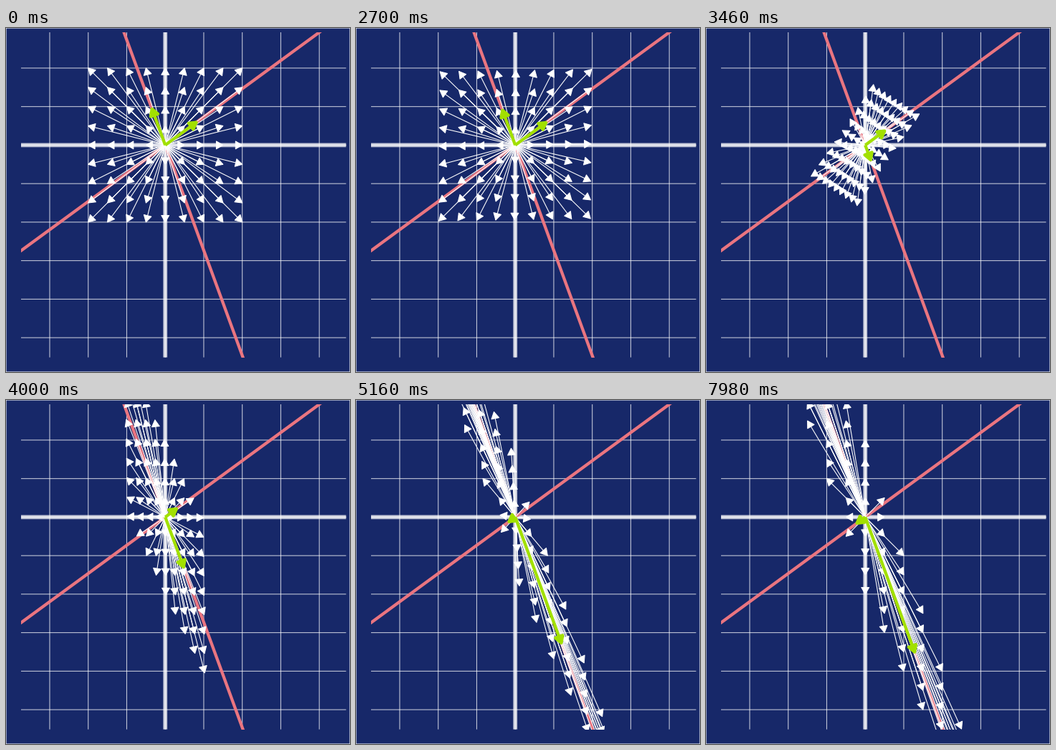
These frames come from a looping animation (480 px wide and 480 px high, 8 s). A matplotlib script:

```python
import numpy as np
import matplotlib.pyplot as plt
from matplotlib.animation import FuncAnimation
from matplotlib.collections import LineCollection, PolyCollection
from matplotlib.patches import Rectangle

SIZE, DPI = 480, 96
PX = 72 / DPI  # one pixel in points
NAVY, PINK, LIME = "#172869", "#EA7580", "#A2E000"

ORIGIN = np.array([222.2, 163.4])
UNIT = 53.74
LEFT, RIGHT, TOP, BOTTOM = 20.8, 474.5, 5.5, 459.6
HEAD = 10.8  # edge length of an arrowhead
LINE, AXIS, BOLD = 1.07, 5.7, 4.27

HOLD, MOVE = 134, 132
progress = np.concatenate([np.zeros(HOLD), np.linspace(0, 1, MOVE), np.ones(HOLD)])

A = np.array([[-1, 1], [2, -3]])
slopes = np.array([-1 + np.sqrt(3), -1 - np.sqrt(3)])

steps = np.arange(-4, 5) / 2
lattice = np.array([(x, y) for x in steps for y in steps if x or y])
eigen = np.array([(1, m) for m in slopes]) / np.sqrt(1 + slopes**2)[:, None]
eigen[1] *= -1

fig = plt.figure(figsize=(SIZE / DPI, SIZE / DPI), dpi=DPI, facecolor=NAVY)
ax = fig.add_axes([0, 0, 1, 1])
ax.set_xlim(0, SIZE)
ax.set_ylim(SIZE, 0)
ax.axis("off")

panel = Rectangle((LEFT, TOP), RIGHT - LEFT, BOTTOM - TOP,
                  transform=ax.transData)


def to_px(v):
    return ORIGIN + UNIT * v * [1, -1]


def rule(xs, ys, color, width, alpha=1.0, z=1):
    line, = ax.plot(xs, ys, color=color, lw=width * PX, alpha=alpha, zorder=z,
                    solid_capstyle="butt", snap=False)
    line.set_clip_path(panel)


class Arrows:
    """Vectors from the origin with closed triangular heads."""

    def __init__(self, vectors, color, width, z):
        self.vectors = vectors
        self.shafts = LineCollection([], colors=color, linewidths=width * PX,
                                     capstyle="butt", zorder=z)
        self.heads = PolyCollection([], facecolors=color, edgecolors=color,
                                    linewidths=width * PX, joinstyle="round",
                                    zorder=z + 0.1)
        for part in (self.shafts, self.heads):
            ax.add_collection(part, autolim=False)
            part.set_clip_path(panel)

    def update(self, matrix):
        tips = to_px(self.vectors @ matrix.T)
        d = tips - ORIGIN
        length = np.maximum(np.hypot(d[:, 0], d[:, 1]), 1e-9)
        d = d / length[:, None]
        side = np.column_stack([-d[:, 1], d[:, 0]]) * HEAD / 2
        base = tips - d * HEAD * np.cos(np.pi / 6)
        start = np.broadcast_to(ORIGIN, tips.shape)
        self.shafts.set_segments(np.stack([start, tips], axis=1))
        self.heads.set_verts(np.stack([base + side, tips, base - side], axis=1))
        return self.shafts, self.heads


ax.add_patch(Rectangle((0, 0), SIZE, SIZE, fill=False, ec="white",
                       lw=LINE * PX, snap=False))

for k in range(-3, 5):
    x = ORIGIN[0] + k * UNIT
    rule([x, x], [TOP, BOTTOM], "white", LINE, 0.75)
for k in range(-5, 3):
    y = ORIGIN[1] - k * UNIT
    rule([LEFT, RIGHT], [y, y], "white", LINE, 0.75)

rule([LEFT, RIGHT], [ORIGIN[1]] * 2, "white", AXIS, 0.75, 2)
rule([ORIGIN[0]] * 2, [TOP, BOTTOM], "white", AXIS, 0.75, 2)
rule([LEFT, RIGHT], [ORIGIN[1]] * 2, "white", LINE, 0.8, 2.1)
rule([ORIGIN[0]] * 2, [TOP, BOTTOM], "white", LINE, 0.8, 2.1)

for m in slopes:
    ends = to_px(np.array([(-6, -6 * m), (6, 6 * m)]))
    rule(ends[:, 0], ends[:, 1], PINK, BOLD, z=3)

field = Arrows(lattice, "white", LINE, 4)
basis = Arrows(eigen, LIME, BOLD, 5)


def draw(i):
    s = progress[i]
    matrix = (1 - s) * np.eye(2) + s * A
    return *field.update(matrix), *basis.update(matrix)


anim = FuncAnimation(fig, draw, frames=len(progress), interval=20,
                     repeat=True, repeat_delay=0)
plt.show()
```
